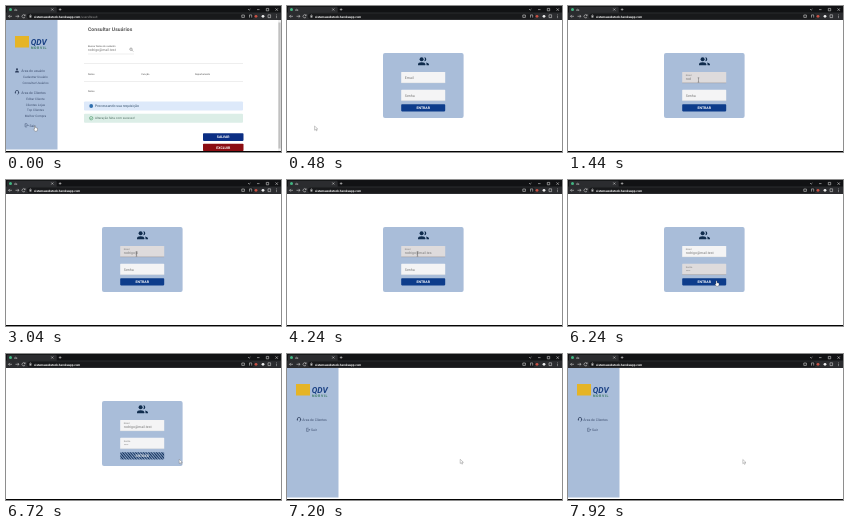
Animation, 275 px wide and 146 px high, one loop 8 s. Source, as an HTML page:

```html
<!DOCTYPE html>
<html lang="pt-BR">
<head>
<meta charset="utf-8">
<title>Login</title>
<style>
html, body { margin: 0; width: 100%; height: 100%; overflow: hidden; background: #fff; }
svg { display: block; width: 100vw; height: 100vh; }
text { font-family: Roboto, Arial, sans-serif; font-size: 3.6px; fill: #444; text-rendering: geometricPrecision; white-space: pre; }
.b { font-weight: 700; }
.w { fill: #fff; }
.g { fill: #777; }
.m { text-anchor: middle; }
.tiny { font-size: 2.4px; }
.menu { fill: #3d4e6e; font-size: 3.4px; }
.sub { fill: #3d4e6e; font-size: 3.1px; text-anchor: middle; }
.line { fill: none; stroke: #ddd; stroke-width: .5; }
.ico { fill: none; stroke: #ccc; stroke-width: .6; }
</style>
</head>
<body>
<svg viewBox="0 0 275 146" preserveAspectRatio="none">
  <defs>
    <pattern id="stripes" width="2" height="2" patternUnits="userSpaceOnUse">
      <rect width="2" height="2" fill="#a9bddb"/><rect width="1.2" height="2" fill="#12335f"/>
    </pattern>
    <g id="person">
      <circle cx="11" cy="63.3" r="1"/><path d="M9 66.6q0-2 2-2t2 2z"/>
    </g>
    <g id="headset" fill="none" stroke="#2c3d5c" stroke-width=".7">
      <path d="M-1.6 1V0a1.6 1.6 0 0 1 3.2 0v1M-1.6 0v1.6M1.6 0v1.6l-1.2.7"/>
    </g>
    <g id="exit" fill="none" stroke="#3d4e6e" stroke-width=".5">
      <path d="M.6-1.6h-2v3.2h2M-.4 0h2.2M1-.8l.8.8-.8.8"/>
    </g>
    <g id="side">
      <rect y="14" width="51.5" height="129.5" fill="#a9bdd9"/>
      <rect x="9" y="30" width="14" height="11.5" fill="#e5b426"/>
      <text x="24.7" y="38.5" class="b" style="font-size:8.3px;font-style:italic;fill:#183f83">QDV</text>
      <text x="25" y="42.7" class="b" style="font-size:3.5px;letter-spacing:.6px;fill:#3c7a62">NORVIL</text>
    </g>
  </defs>

  <rect width="275" height="146" fill="#fff"/>

  <g id="query">
    <use href="#side"/>
    <use href="#person" fill="#2c3d5c"/>
    <text x="15.3" y="65.8" class="menu">Área do usuário</text>
    <text x="29.5" y="72.2" class="sub">Cadastrar Usuário</text>
    <text x="29.5" y="77.8" class="sub">Consultar Usuários</text>
    <use href="#headset" x="11" y="86"/>
    <text x="15.3" y="87.8" class="menu">Área de Clientes</text>
    <text x="29.5" y="94" class="sub">Editar Cliente</text>
    <text x="29.5" y="99.6" class="sub">Clientes Lojas</text>
    <text x="29.5" y="105.1" class="sub">Top Clientes</text>
    <text x="29.5" y="110.6" class="sub">Melhor Compra</text>
    <use href="#exit" x="20.5" y="119.3"/>
    <text x="23.5" y="120.5" class="menu">Sair</text>

    <text x="82" y="24.8" class="b" style="font-size:5px;fill:#555;letter-spacing:.08px">Consultar Usuários</text>
    <text x="82" y="41.4" class="tiny">Buscar Nome do cadastro</text>
    <text x="82" y="45.4" class="g" style="font-size:3.5px">rodrigo@mail.test</text>
    <path d="M82 48h46M78 57.5h159M78 75.5h159" class="line"/>
    <g class="ico"><circle cx="125" cy="43.2" r="1.2" stroke="#777"/><path d="M126 44.2l1.2 1.2" stroke="#777"/></g>
    <text x="82" y="69.3" class="tiny">Nome</text>
    <text x="135.5" y="69.3" class="tiny">Função</text>
    <text x="189" y="69.3" class="tiny">Departamento</text>
    <text x="82" y="85.8" class="tiny">Nome</text>
    <rect x="78" y="95.5" width="159" height="9" rx="1" fill="#dde9fa"/>
    <circle cx="85.2" cy="100" r="1.9" fill="#2f6fae"/>
    <text x="89" y="101.2" style="font-size:3.5px;fill:#36516c">Processando sua requisição</text>
    <rect x="78" y="107.7" width="159" height="9" rx="1" fill="#dceee7"/>
    <circle cx="85.2" cy="112.2" r="1.7" fill="none" stroke="#4a9a6a" stroke-width=".6"/>
    <path d="M84.3 112.2l.7.7 1.2-1.4" fill="none" stroke="#4a9a6a" stroke-width=".5"/>
    <text x="89" y="113.3" style="font-size:3.1px;fill:#4d6b60">Alteração feita com sucesso!</text>
    <rect x="197" y="127.3" width="40.5" height="7.6" rx=".8" fill="#0b2e83"/>
    <text x="217.2" y="132.4" class="b w m" style="font-size:3.5px">SALVAR</text>
    <rect x="197" y="137.8" width="40.5" height="7.2" rx=".8" fill="#8c0d12"/>
    <text x="217.2" y="142.7" class="b w m" style="font-size:3.5px">EXCLUIR</text>
    <rect x="272" y="14" width="3" height="131" fill="#f1f1f1"/>
    <rect x="272.4" y="16.5" width="2.2" height="126" fill="#c1c1c1"/>
  </g>

  <g id="login">
    <rect x="96" y="47" width="80.6" height="65" rx="2" fill="#a9bdd9"/>
    <g fill="#102c4d">
      <circle cx="134.6" cy="53.3" r="2"/><path d="M131 59.3v-1q0-2 3.6-2t3.7 2v1z"/>
      <path d="M137.3 51.3a2 2 0 0 1 0 4a3.2 3.2 0 0 0 0-4M139 56.5q3 .4 3 2v.8h-2.5v-1q0-1-.5-1.8"/>
    </g>
    <g id="email" transform="translate(114.2 66)"></g>
    <g id="pass" transform="translate(114.2 83.8)"></g>
    <rect id="button" x="114.2" y="98.2" width="44" height="7.2" rx=".8"/>
    <text id="enter" x="136.2" y="103" class="b w m" style="font-size:3.5px">ENTRAR</text>
  </g>

  <g id="home">
    <use href="#side"/>
    <use href="#headset" x="12" y="65"/>
    <text x="15.3" y="66.5" class="menu">Área de Clientes</text>
    <use href="#exit" x="21" y="75.8"/>
    <text x="24" y="77" class="menu">Sair</text>
  </g>

  <g id="chrome">
    <rect width="275" height="7" fill="#111214"/>
    <path d="M1 7V2q0-1.2 1.2-1.2h47.3q1.2 0 1.2 1.2v5z" fill="#2b2c2f"/>
    <rect y="6.5" width="275" height="7.5" fill="#2b2c2f"/>
    <rect x="21" y="7.4" width="227" height="5.6" rx="2.8" fill="#18191b"/>
    <circle cx="4.5" cy="3.6" r="1.5" fill="#41b883"/>
    <text x="8" y="4.8" style="fill:#ddd;font-size:3.2px">ds</text>
    <g class="ico">
      <path d="M45.3 2.5l2 2m0-2l-2 2M52.8 3.5h2.6m-1.3-1.3v2.6"/>
      <path d="M6 10.3H2.5m1.4-1.4l-1.4 1.4 1.4 1.4M9.5 10.3H13m-1.4-1.4l1.4 1.4-1.4 1.4"/>
      <path d="M19 9.4a1.6 1.6 0 1 0 .1 1.6M19.2 8.5v1.2H18"/>
      <path d="M242 3l1.2 1.2L244.4 3M251 3.6h2.5M260.3 2.4h2.4v2.4h-2.4zM269.5 2.4l2.4 2.4m0-2.4l-2.4 2.4"/>
      <path d="M235.8 9h2.6v2.4h-2.6zM243.5 11.6V8.9h2.2v2.7M262 8.8h2.6v2.8H262z"/>
      <path d="M270.5 8.6v.7m0 .7v.7m0 .7v.7" stroke="#eee"/>
    </g>
    <circle cx="250" cy="10.3" r="1.4" fill="#c95043"/>
    <circle cx="257" cy="10.3" r="1.4" fill="#eee"/>
    <rect x="23.5" y="9.8" width="1.9" height="1.8" fill="#bbb"/>
    <path d="M23.9 9.8v-.6a.6.6 0 0 1 1.1 0v.6" class="ico"/>
    <text x="28" y="11.5" class="b" style="fill:#fff;font-size:3.05px">sistemawebstock.herokuapp.com<tspan id="path" style="fill:#999;font-weight:400">/usersResult</tspan></text>
    <rect y="145" width="275" height="1" fill="#050505"/>
  </g>

  <g id="arrow"><path d="M0 0v4.2l1-.9.7 1.6.8-.4-.7-1.5h1.4z" fill="#fff" stroke="#666" stroke-width=".35"/></g>
  <g id="hand"><path d="M0 0q.6-.7 1 0v1.7l2 .5v1.6l-.6 1.4H.3L-1 3.2l.4-.4.6.5z" fill="#fff" stroke="#444" stroke-width=".35"/></g>
  <g id="beam"><path d="M-.8-2.2h1.6M0-2.2v4.4M-.8 2.2h1.6" fill="none" stroke="#444" stroke-width=".4"/></g>
</svg>
<script>
const LOOP = 8000;
const address = 'rodrigo@mail.test';
const emailKeys = [1200, 1280, 1440, 1600, 1680, 2000, 2560, 3040, 3280, 3360, 3440, 3760, 3920, 4080, 4160, 4240, 4400];
const passKeys = [5040, 5360, 5440, 5520];
// Pointer stops: time, x, y
const stops = [[0, 28.5, 120], [560, 27.5, 120], [1040, 130.5, 74], [6000, 130.5, 74], [6240, 148, 101], [6400, 148, 101], [6640, 173.2, 105.3], [7680, 173.2, 105.3], [7920, 174.8, 105.5]];

const el = id => document.getElementById(id);
const show = (id, on) => el(id).style.display = on ? '' : 'none';
const typed = (keys, t) => keys.filter(k => k <= t).length;

function pointer(t) {
  const i = stops.findIndex(s => s[0] > t);
  if (i < 0) return stops.at(-1).slice(1);
  const [t0, x0, y0] = stops[i - 1], [t1, x1, y1] = stops[i];
  const p = (t - t0) / (t1 - t0), e = p * p * (3 - 2 * p);
  return [x0 + (x1 - x0) * e, y0 + (y1 - y0) * e];
}

function field(id, label, value, focused) {
  const up = focused || value;
  el(id).innerHTML = `<rect width="44" height="11" rx=".6" fill="${focused ? '#dedbdc' : '#f4f4f5'}"/>
    <path d="M0 10.8h44" stroke="${focused ? '#8a8587' : '#d2d4d8'}" stroke-width=".4"/>
    <text x="3.6" y="${up ? 3.9 : 7}" class="g" style="font-size:${up ? 2.3 : 3.6}px">${label}</text>
    <text x="3.6" y="8.2" class="g" style="font-size:3.5px">${value}</text>`;
}

function draw(t) {
  const login = t >= 240 && t < 6960;
  show('query', t < 240);
  show('path', t < 240);
  show('login', login);
  show('home', t >= 6960);

  if (login) {
    field('email', 'Email', address.slice(0, typed(emailKeys, t)), t >= 1120 && t < 4640);
    field('pass', 'Senha', '•'.repeat(typed(passKeys, t)), t >= 4640 && t < 6320);
    const busy = t >= 6320;
    el('button').setAttribute('fill', busy ? 'url(#stripes)' : '#0d3c8b');
    el('enter').style.opacity = busy ? .8 : 1;
    el('stripes').setAttribute('patternTransform', `translate(${t / 100 % 60} 0) rotate(-40)`);
  }

  const [x, y] = pointer(t);
  const beam = t >= 1000 && t < 6060;
  const hand = t < 240 || t >= 6160 && t < 6480;
  const shape = beam ? 'beam' : hand ? 'hand' : 'arrow';
  for (const id of ['arrow', 'hand', 'beam']) show(id, id === shape);
  el(shape).setAttribute('transform', `translate(${x} ${y})`);
}

const start = performance.now();
(function tick() {
  draw((performance.now() - start) % LOOP);
  requestAnimationFrame(tick);
})();
</script>
</body>
</html>
```
